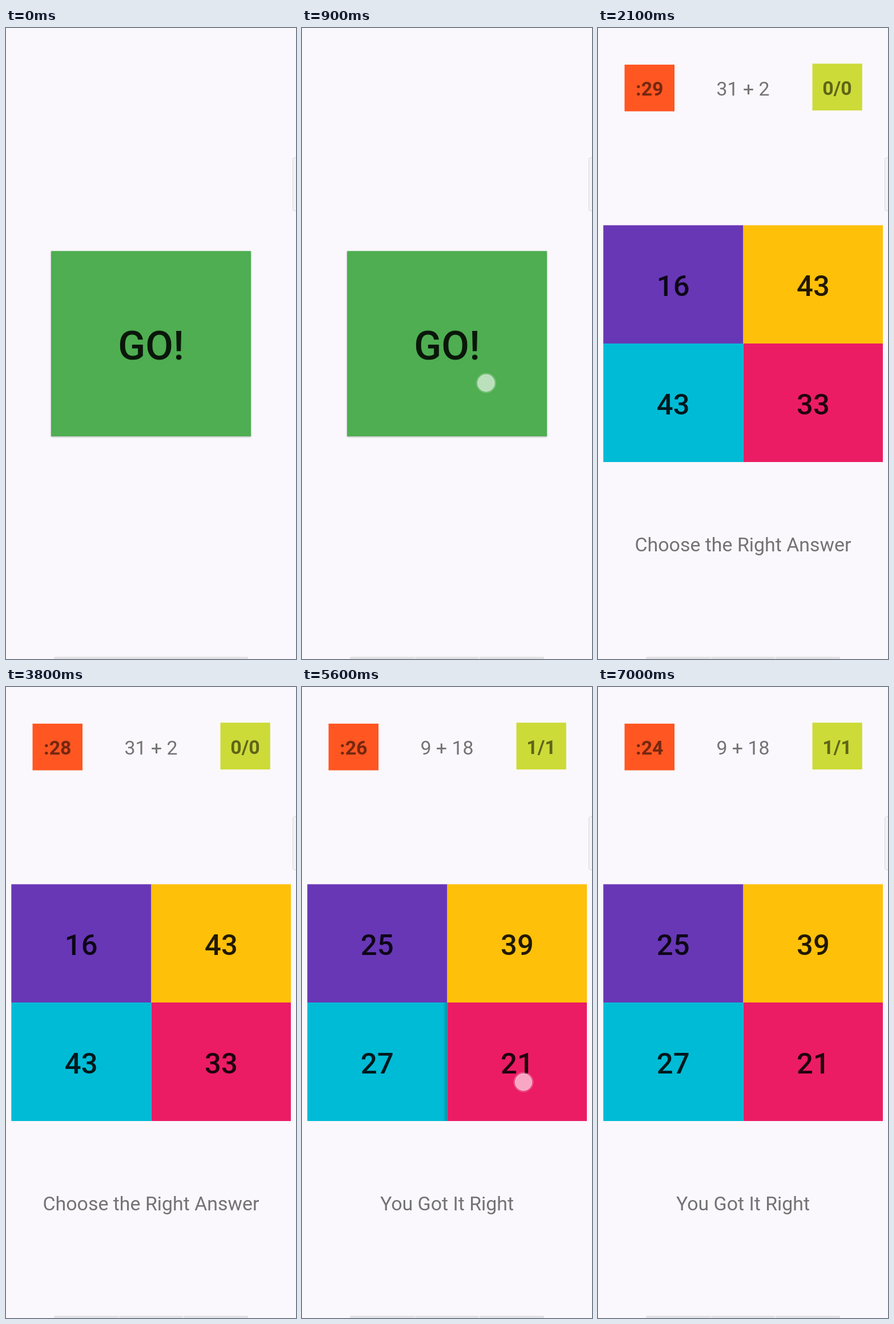
An HTML page that plays this animation: 508x1102 px, repeating every 8000 ms.

```html
<!DOCTYPE html>
<html lang="en">
<head>
<meta charset="utf-8">
<title>Quick sums</title>
<style>
  html, body { margin: 0; width: 100%; height: 100%; overflow: hidden; background: #faf8fc; }
  svg { display: block; width: 508px; height: 1102px; }
  text { font-family: Roboto, sans-serif; text-anchor: middle; fill: #000; }
  .label { font-size: 33.9px; fill-opacity: .54; }
  .bold { font-weight: 700; }
  .num { font-size: 50.8px; font-weight: 500; fill-opacity: .87; }
  .go { font-size: 70.6px; font-weight: 500; fill-opacity: .87; }
</style>
</head>
<body>
<svg viewBox="0 0 508 1102">
  <defs>
    <filter id="soft" x="-5%" y="-5%" width="110%" height="110%">
      <feGaussianBlur stdDeviation="1.6"/>
    </filter>
    <linearGradient id="edge">
      <stop offset="0" stop-opacity="0"/>
      <stop offset="1" stop-opacity=".24"/>
    </linearGradient>
  </defs>
  <rect width="508" height="1102" fill="#faf8fc"/>

  <g id="start">
    <rect x="79" y="391" width="350" height="323" fill-opacity=".34" filter="url(#soft)"/>
    <rect x="79" y="389.5" width="350" height="323.5" fill="#4eae51"/>
    <text class="go" x="254" y="579">GO!</text>
  </g>

  <g id="game">
    <rect x="46.5" y="64" width="87.5" height="81.5" fill="#ff5622"/>
    <rect x="375.5" y="62.3" width="87.3" height="81.7" fill="#ccdb38"/>
    <text class="label bold" id="timer" x="90.3" y="118.3"></text>
    <text class="label" id="sum" x="254" y="118.3"></text>
    <text class="label bold" id="score" x="419" y="117"></text>
    <g id="tiles"></g>
    <rect id="lift" x="247" y="551" width="7.5" height="207" fill="url(#edge)"/>
    <text class="label" id="message" x="254" y="913.7"></text>
  </g>

  <rect x="502.5" y="226.5" width="9" height="93" rx="3" fill="#f3f2f5" stroke="#d8d7da"/>
  <path d="M84 1102v-1.5q0-2.5 2.5-2.5h335q2.5 0 2.5 2.5v1.5z" fill="#e3e2e5"/>
  <path id="gaps" d="M197.5 1098v4M310 1098v4" stroke="#f8f6fa" stroke-width="1.4"/>

  <g id="touch">
    <circle r="17.3" fill="#fff" fill-opacity=".16"/>
    <circle r="17" fill="none" stroke="#fff" stroke-opacity=".35" stroke-dasharray="1 1"/>
    <circle r="15" fill="#fff" fill-opacity=".54"/>
    <circle r="14.6" fill="none" stroke="#fff" stroke-opacity=".3" stroke-width="1.2"/>
  </g>
</svg>
<script>
const LOOP = 8000;
const GAME_AT = 1000, ANSWER_AT = 5600;
const TICKS = [2000, 3000, 4100, 5100, 6100, 7000];
const TAPS = [
  { from: 900, to: 1100, x: 322.5, y: 620 },
  { from: 5500, to: 5700, x: 388, y: 690 }
];
const ROUNDS = [
  { sum: '31 + 2', score: '0/0', message: 'Choose the Right Answer', answers: [16, 43, 43, 33] },
  { sum: '9 + 18', score: '1/1', message: 'You Got It Right', answers: [25, 39, 27, 21] }
];
const COLORS = ['#6837b6', '#ffc009', '#00bbd6', '#eb1c63'];

const el = id => document.getElementById(id);
const show = (id, on) => el(id).setAttribute('visibility', on ? 'inherit' : 'hidden');
const write = (node, text) => {
  if (node.textContent !== String(text)) node.textContent = text;
};
const add = (name, attrs) => {
  const node = document.createElementNS('http://www.w3.org/2000/svg', name);
  for (const key in attrs) node.setAttribute(key, attrs[key]);
  return el('tiles').appendChild(node);
};

const numbers = COLORS.map((fill, i) => {
  const col = i % 2, row = i >> 1;
  const x = col ? 254.5 : 9.3, y = row ? 551 : 344.5;
  add('rect', { x, y, width: col ? 244.5 : 245.2, height: row ? 207 : 206.5, fill });
  return add('text', { class: 'num', x: x + 122.4, y: row ? 675 : 468 });
});

function draw(t) {
  const playing = t >= GAME_AT;
  show('start', !playing);
  show('game', playing);
  show('gaps', t >= 400);

  const round = ROUNDS[t >= ANSWER_AT ? 1 : 0];
  for (const id of ['sum', 'score', 'message']) write(el(id), round[id]);
  numbers.forEach((node, i) => write(node, round.answers[i]));
  write(el('timer'), ':' + (30 - TICKS.filter(at => t >= at).length));

  const lift = Math.min((t - 5500) / 100, (5900 - t) / 100, 1);
  el('lift').setAttribute('opacity', Math.max(0, lift));

  const tap = TAPS.find(p => t >= p.from && t < p.to);
  show('touch', tap);
  if (tap) el('touch').setAttribute('transform', `translate(${tap.x} ${tap.y})`);
}

const began = performance.now();
function frame() {
  draw((performance.now() - began) % LOOP);
  requestAnimationFrame(frame);
}
draw(0);
requestAnimationFrame(frame);
</script>
</body>
</html>
```
